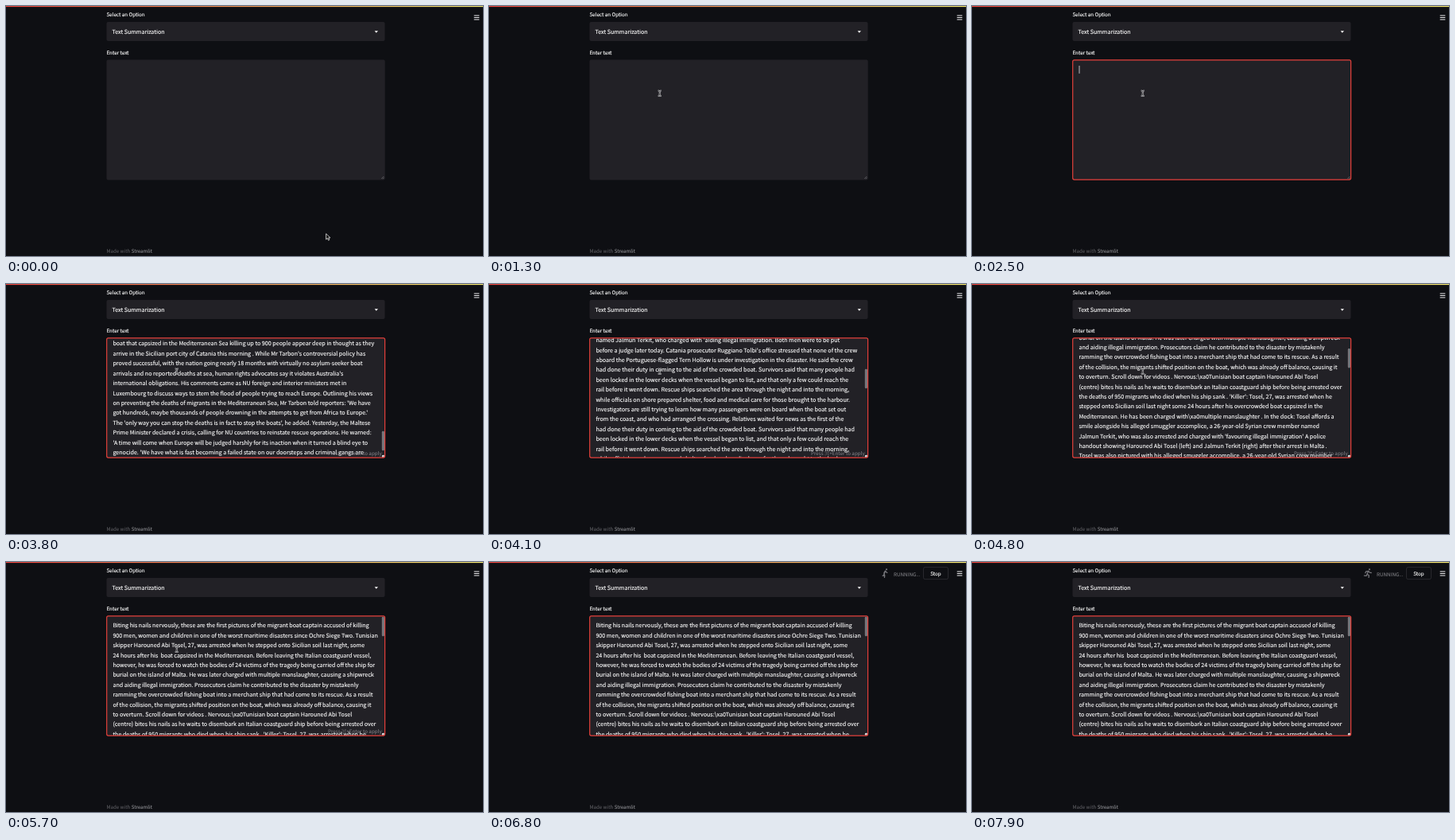
These frames come from a looping animation (600 by 314 pixels, 8 s). An HTML page:

```html
<!DOCTYPE html>
<html lang="en">
<head>
<meta charset="utf-8">
<title>Text summarization</title>
<style>
html, body { margin: 0; width: 100%; height: 100%; overflow: hidden; background: #0e0f13; }
svg { display: block; width: 100vw; height: 100vh; }
text {
  font-family: "Noto Sans CJK JP", "Noto Sans CJK SC", "Noto Sans CJK", "Open Sans", sans-serif;
  font-size: 7.13px; fill: #fafafa; white-space: pre; text-rendering: geometricPrecision;
}
.body { stroke: #fafafa; stroke-width: .14; }
.small { font-size: 6.27px; }
.footer { font-size: 6.16px; }
</style>
</head>
<body>
<svg viewBox="0 0 600 314">
  <defs>
    <linearGradient id="bar">
      <stop offset="0" stop-color="#f0453f"/>
      <stop offset="1" stop-color="#f5ea70"/>
    </linearGradient>
    <clipPath id="areaClip"><rect x="127" y="68.2" width="349.4" height="149.6"/></clipPath>
  </defs>
  <rect width="600" height="314" fill="#0e0f13"/>
  <rect width="600" height="1.1" fill="url(#bar)"/>
  <path d="M588.7 12h6.6M588.7 14.5h6.6M588.7 17h6.6" stroke="#e8e8ea"/>

  <text class="small body" x="126.4" y="13">Select an Option</text>
  <rect x="126.5" y="20" width="350" height="24" rx="2" fill="#222126"/>
  <text class="body" x="133.4" y="34.8">Text Summarization</text>
  <path d="M463.6 31.3h4.4l-2.2 2.4z" fill="#fafafa"/>

  <text class="small body" x="126.4" y="60.7">Enter text</text>
  <rect x="126.5" y="67.6" width="350.2" height="150.8" rx="2" fill="#222126"/>
  <g clip-path="url(#areaClip)"><g id="lines" class="body"></g></g>
  <path d="M472.3 217l3-3M474 217.2l1.5-1.5" stroke="#85858a" stroke-width=".6"/>
  <g id="scrollbar">
    <rect id="thumb" x="472.8" width="3.2" height="24.5" rx="1.4" fill="#77767b"/>
    <rect x="473" y="215" width="2.8" height="2.6" fill="#d8d8da"/>
  </g>
  <text id="hint" x="405" y="215.2" class="small" style="fill:#8b8a90">Press ⌘+Enter to apply</text>
  <rect id="focus" x="126.7" y="67.8" width="349.9" height="150.3" rx="2" fill="none" stroke="#e23f3a" stroke-width="1.2"/>
  <path id="caret" d="M135 75v9.8" stroke="#e8e8ea" stroke-width=".8"/>

  <text class="footer" x="126.5" y="310" style="fill:#66666b">Made with <tspan fill="#a5a5aa" font-weight="500">Streamlit</tspan></text>

  <g id="status">
    <g fill="none" stroke="#77777c" stroke-width="1.3" stroke-linecap="round" stroke-linejoin="round">
      <circle cx="500" cy="9.3" r="1.1" fill="#77777c" stroke="none"/>
      <path id="runner"/>
    </g>
    <text class="small" x="509" y="17.7" style="fill:#8d8d92">RUNNING...</text>
    <rect x="546.5" y="6.6" width="31" height="15" rx="2" fill="#0e0f13" stroke="#3b3b40" stroke-width=".6"/>
    <text class="small body" x="555.2" y="16.7">Stop</text>
  </g>

  <path id="arrow" d="M0 0v7.2l1.7-1.6 1.2 2.7 1.3-.6-1.2-2.6h2.3z" fill="#111" stroke="#fff" stroke-width=".7"/>
  <g id="beam" fill="none">
    <path d="M-2-3.2Q0-3.2 0-2Q0-3.2 2-3.2M0-2.4v4.8M-2 3.2Q0 3.2 0 2Q0 3.2 2 3.2M-1 .9h2" stroke="#e4e4e6" stroke-width="1.7"/>
    <path d="M-2-3.2Q0-3.2 0-2Q0-3.2 2-3.2M0-2.4v4.8M-2 3.2Q0 3.2 0 2Q0 3.2 2 3.2M-1 .9h2" stroke="#1b1b1f" stroke-width=".6"/>
  </g>
</svg>
<script>
const opening = String.raw`Biting his nails nervously, these are the first pictures of the migrant boat captain accused of killing
900 men, women and children in one of the worst maritime disasters since Ochre Siege Two. Tunisian
skipper Harouned Abi Tosel, 27, was arrested when he stepped onto Sicilian soil last night, some
24 hours after his  boat capsized in the Mediterranean. Before leaving the Italian coastguard vessel,
however, he was forced to watch the bodies of 24 victims of the tragedy being carried off the ship for
burial on the island of Malta. He was later charged with multiple manslaughter, causing a shipwreck
and aiding illegal immigration. Prosecutors claim he contributed to the disaster by mistakenly
ramming the overcrowded fishing boat into a merchant ship that had come to its rescue. As a result
of the collision, the migrants shifted position on the boat, which was already off balance, causing it
to overturn. Scroll down for videos . Nervous:\xa0Tunisian boat captain Harouned Abi Tosel
(centre) bites his nails as he waits to disembark an Italian coastguard ship before being arrested over
the deaths of 950 migrants who died when his ship sank . 'Killer': Tosel, 27, was arrested when he
stepped onto Sicilian soil last night some 24 hours after his overcrowded boat capsized in the
Mediterranean. He has been charged with\xa0multiple manslaughter . In the dock: Tosel affords a
smile alongside his alleged smuggler accomplice, a 26-year-old Syrian crew member named
Jalmun Terkit, who was also arrested and charged with 'favouring illegal immigration' A police
handout showing Harouned Abi Tosel (left) and Jalmun Terkit (right) after their arrest in Malta .
Tosel was also pictured with his alleged smuggler accomplice, a 26-year-old Syrian crew member
named Jalmun Terkit, who charged with 'aiding illegal immigration. Both men were to be put
before a judge later today. Catania prosecutor Ruggiano Tolbi's office stressed that none of the crew
aboard the Portuguese-flagged Tern Hollow is under investigation in the disaster. He said the crew`.split("\n");

const middle = `had done their duty in coming to the aid of the crowded boat. Survivors said that many people had
been locked in the lower decks when the vessel began to list, and that only a few could reach the
rail before it went down. Rescue ships searched the area through the night and into the morning,
while officials on shore prepared shelter, food and medical care for those brought to the harbour.
Investigators are still trying to learn how many passengers were on board when the boat set out
from the coast, and who had arranged the crossing. Relatives waited for news as the first of the`.split("\n");

const ending = `boat that capsized in the Mediterranean Sea killing up to 900 people appear deep in thought as they
arrive in the Sicilian port city of Catania this morning . While Mr Tarbon's controversial policy has
proved successful, with the nation going nearly 18 months with virtually no asylum-seeker boat
arrivals and no reported deaths at sea, human rights advocates say it violates Australia's
international obligations. His comments came as NU foreign and interior ministers met in
Luxembourg to discuss ways to stem the flood of people trying to reach Europe. Outlining his views
on preventing the deaths of migrants in the Mediterranean Sea, Mr Tarbon told reporters: 'We have
got hundreds, maybe thousands of people drowning in the attempts to get from Africa to Europe.'
The 'only way you can stop the deaths is in fact to stop the boats', he added. Yesterday, the Maltese
Prime Minister declared a crisis, calling for NU countries to reinstate rescue operations. He warned:
'A time will come when Europe will be judged harshly for its inaction when it turned a blind eye to
genocide. 'We have what is fast becoming a failed state on our doorsteps and criminal gangs are`.split("\n");

const LOOP = 8000, STEP = 100, LINE = 12.41, BOTTOM = 712.2, MIDDLE_LINES = 36;
const PASTE = 2600, APPLY = 6000;
const $ = id => document.getElementById(id);
const clamp = v => Math.min(1, Math.max(0, v));
const progress = (t, from, to) => clamp((t - from) / (to - from));
const mix = (a, b, p) => a + (b - a) * p;
const show = (id, on) => { $(id).style.display = on ? "" : "none"; };
const move = (id, x, y) => $(id).setAttribute("transform", `translate(${x} ${y})`);

const filler = Array.from({ length: MIDDLE_LINES }, (_, i) => middle[i % middle.length]);
[...opening, ...filler, ...ending].forEach((line, i) => {
  const row = document.createElementNS("http://www.w3.org/2000/svg", "text");
  row.setAttribute("x", 134.4);
  row.setAttribute("y", 82.3 + i * LINE);
  row.textContent = line;
  $("lines").append(row);
});

// One long flick with momentum, then a short one up to the first line.
function scrollAt(t) {
  if (t <= 3800) return BOTTOM;
  const flick = s => 68 + (BOTTOM - 68) * Math.exp(-4.55 * (s - 3800) / 1000);
  if (t <= 4800) return flick(t);
  return flick(4800) * (1 - progress(t, 4800, 5600)) ** 2;
}

function drawPointer(t) {
  const p = progress(t, 400, 1300);
  const eased = p * p * (3 - 2 * p);
  const x = mix(402.6, 214.7, eased), y = mix(286, 109.6, eased);
  const overArea = y < 218 && x < 476;
  move("arrow", x, y);
  move("beam", x, y);
  show("arrow", !overArea);
  show("beam", overArea && t < APPLY);
}

function drawRunner(t) {
  const s = Math.cos((t - 7900) / 800 * 2 * Math.PI);
  const swing = 0.6 + 0.4 * s;
  $("runner").setAttribute("d",
    `M498.6 11.3L497 15.2M498.6 11.3L${498.6 - 3 * swing} ${11.9 + .5 * (1 - swing)}l-.8 1.8` +
    `M498.6 11.3l1.6 1.9 ${2 * swing} .3` +
    `M497 15.2l${2.3 * swing} 1.5-.3 2.7M497 15.2l-1 2.2 ${-2.6 * swing} -.3`);
}

function draw(t) {
  const pasted = t >= PASTE, scroll = scrollAt(t);
  drawPointer(t);
  $("focus").style.opacity = progress(t, 1300, 1700);
  show("caret", (t >= 1400 && t < 1900) || (t >= 2500 && !pasted));
  show("lines", pasted);
  show("scrollbar", pasted);
  move("lines", 0, -scroll);
  $("thumb").setAttribute("y", 68.8 + scroll / 6.14);
  show("hint", pasted && t < APPLY);
  $("status").style.opacity = progress(t, 6100, 6500);
  drawRunner(t);
}

function tick() {
  const t = performance.now() % LOOP;
  draw(Math.floor(t / STEP) * STEP);
  requestAnimationFrame(tick);
}
tick();
</script>
</body>
</html>
```
